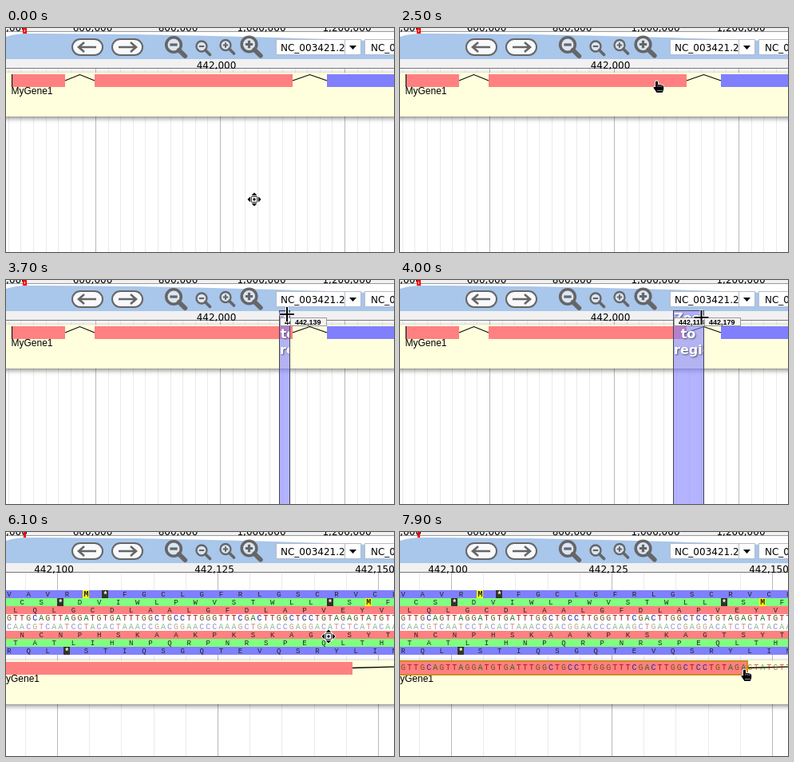
Recreate the animation shown at these times as an HTML page. Size 486 px wide and 281 px high, loop 8 s.

```html
<!DOCTYPE html>
<html lang="en">
<head>
<meta charset="utf-8">
<title>Zoom to a region</title>
<style>
  html, body { margin: 0; width: 486px; height: 281px; overflow: hidden; background: #fff; }
  svg { display: block; }
  text { font: 12px "DejaVu Sans", sans-serif; white-space: pre; }
  .gene { font-family: "Liberation Sans", Arial, sans-serif; }
  .seq { font: 10px "Liberation Mono", "Courier New", monospace; text-anchor: middle; }
  .amino { font-size: 9px; }
  .bold { font-weight: bold; }
  .flag { font: bold 9px "Liberation Sans", Arial, sans-serif; }
  .zoom { font: bold 16px "DejaVu Sans", sans-serif; fill: #fff; text-shadow: 1px 1px 2px #557; }
  .mid { text-anchor: middle; }
  .crisp { shape-rendering: crispEdges; }
  .track { filter: drop-shadow(0 2px 3px rgba(0, 0, 0, .5)); }
</style>
</head>
<body>
<svg id="stage" width="486" height="281" viewBox="0 0 486 281">
  <defs>
    <clipPath id="band"><rect id="bandClip" y="39" height="242"/></clipPath>
  </defs>
  <g id="far"></g>
  <g id="near"></g>
  <g id="head"></g>
  <g id="guides"></g>
  <g id="pointer"></g>
</svg>
<script>
const LOOP = 8000, W = 486, H = 281;
const BLUE = '#8080ff', GREEN = '#80ff80', RED = '#ff8080', CREAM = '#ffffdd', INK = '#666';
const BASE_COLORS = { A: '#1a701a', C: '#2a2aa0', G: '#785618', T: '#b01818' };
const PAIR = { A: 'T', T: 'A', C: 'G', G: 'C' };
const DNA = 'GTTGCAGTTAGGATGTGATTTGGCTGCCTTGGGTTTCGACTTGGCTCCTGTAGAGTATGTT';
const BP = 8.04, FAR_BP = 0.6243;

const $ = id => document.getElementById(id);

function add(parent, tag, attrs = {}, content) {
  const el = document.createElementNS('http://www.w3.org/2000/svg', tag);
  for (const k in attrs) el.setAttribute(k, attrs[k]);
  if (content !== undefined) el.textContent = content;
  parent.appendChild(el);
  return el;
}
const rect = (p, x, y, width, height, fill, more) =>
  add(p, 'rect', { x, y, width, height, fill, class: 'crisp', ...more });
const text = (p, x, y, str, cls = '', more) => add(p, 'text', { x, y, class: cls, ...more }, str);
const line = (p, d, stroke, width = 1, more) =>
  add(p, 'path', { d, stroke, 'stroke-width': width, fill: 'none', ...more });
const show = (el, on) => el.setAttribute('visibility', on ? 'visible' : 'hidden');

function grid(p, first, step, count, isMajor) {
  for (let i = 0; i < count; i++) {
    rect(p, Math.floor(first + i * step), 51, 1, H - 51, isMajor(i) ? '#b9b9b9' : '#ebebeb');
  }
}

const track = (p, y) => rect(p, -20, y, W + 40, 55, CREAM, { class: 'track' });

function buildFar(p) {
  grid(p, 3.2, 25 * FAR_BP, 32, i => i % 10 === 7);
  track(p, 56);
  rect(p, 7, 58, 67, 16, RED);
  rect(p, 111, 58, 248, 16, RED);
  rect(p, 402, 58, 84, 16, BLUE);
  rect(p, 7, 58, 1, 16, '#000');
  line(p, 'M74 66L92.5 58.5L111 66M359 66L380.5 58.5L402 66', '#000', 1.1);
  text(p, 6.5, 83, 'MyGene1', 'gene');
}

const baseX = i => +((i + 0.5) * BP).toFixed(2);

function bases(p, str, y, opacity) {
  for (const b in BASE_COLORS) {
    const at = [...str].flatMap((c, i) => c === b ? [i] : []);
    text(p, at.map(baseX).join(' '), y, b.repeat(at.length), 'seq', { fill: BASE_COLORS[b], opacity });
  }
}

function aminos(p, str, y, offset, fill) {
  rect(p, 0, y, W, 10.4, fill);
  [...str].forEach((c, i) => {
    const x = baseX(offset + 3 * i), stop = c === '*', start = c === 'M';
    if (stop || start) rect(p, Math.floor(x - 4), y, 8, 10, stop ? '#33332a' : '#ffff00');
    text(p, x, y + (stop ? 9 : 8), c, stop || start ? 'seq bold' : 'seq amino', { fill: stop ? '#fff' : '#222' });
  });
}

function buildNear(p) {
  grid(p, 24.3, 40.2, 12, i => i % 5 === 1);
  track(p, 161);
  aminos(p, 'VAVRM*FGCLGFRLGSCRVCL', 73, 0, BLUE);
  aminos(p, 'CS*DVIWLPWVSTWLL*SMF', 83, 2, GREEN);
  aminos(p, 'LQLGCDLAALGFDLAPVEYV', 93, 1, RED);
  rect(p, 0, 103, W, 21, '#fff');
  bases(p, DNA, 111, 1);
  bases(p, [...DNA].map(b => PAIR[b]).join(''), 121.5, 0.5);
  aminos(p, 'NCNPHSKAAKPKSKAGTSYT', 124, 2, RED);
  aminos(p, 'TATLIHNPQRPNRSPEQLTH', 134, 1, GREEN);
  aminos(p, 'RQL*STIQSGQTEVQSRYLIN', 144, 0, BLUE);
  rect(p, 0, 163, 434, 16, RED);
  line(p, 'M434 170.5L711 163', '#000', 1.4);
  text(p, -10, 188, 'MyGene1', 'gene');
  const lit = add(p, 'g');
  rect(lit, -4, 162, 439, 17, RED, { stroke: '#d18a1c', 'stroke-width': 2 });
  bases(lit, DNA.slice(0, 54), 173, 1);
  const rest = add(lit, 'g', { transform: `translate(${54 * BP} 0)` });
  bases(rest, DNA.slice(54), 173, 0.7);
  return lit;
}

function lens(p, x, y, r, reach, width, plus) {
  const k = r * 0.72, s = r * 0.5;
  add(p, 'circle', { cx: x, cy: y, r, fill: '#dbe6f5', stroke: INK, 'stroke-width': width });
  line(p, `M${x + k} ${y + k}L${x + reach} ${y + reach}`, INK, width * 1.6, { 'stroke-linecap': 'round' });
  line(p, `M${x - s} ${y}h${2 * s}` + (plus ? `M${x} ${y - s}v${2 * s}` : ''), INK, width * 0.9);
}

function pill(p, x, dir) {
  add(p, 'rect', { x: x - 19, y: 14, width: 38, height: 20, rx: 10, fill: '#f8f9fb', stroke: INK, 'stroke-width': 2 });
  line(p, `M${x - 11 * dir} 24H${x + 10 * dir}M${x + 4 * dir} 18L${x + 11 * dir} 24L${x + 4 * dir} 30`, INK, 2.6);
}

function buildHead(p) {
  rect(p, 0, 0, W, 39, '#fff');
  rect(p, 0, 0, W, 5, '#f1f1f1');
  rect(p, 0, 4, W, 1, '#999');
  add(p, 'path', { d: 'M0 11Q8 8 22 7H26C160 7 330 11 486 17V39H0Z', fill: '#a9c6eb' });
  [[2, '400,000'], [108.5, '600,000'], [215.5, '800,000'], [320, '1,000,000'], [427, '1,200,000']]
    .forEach(([x, s]) => text(p, x, 4, s, 'mid'));
  const far = add(p, 'g'), near = add(p, 'g');
  rect(far, 21, 0, 5, 7, '#f00');
  rect(far, 23, 2, 1, 3, '#fcc');
  rect(near, 22, 0, 3, 7, '#f00');
  pill(p, 102, -1);
  pill(p, 152, 1);
  lens(p, 210, 21, 9.3, 14.3, 3.6, false);
  lens(p, 245, 23, 6.5, 10.5, 2.3, false);
  lens(p, 275, 21.5, 6.5, 10.5, 2.3, true);
  lens(p, 304.5, 20.5, 9.3, 14.3, 3.6, true);
  rect(p, 338.5, 14.5, 106, 19, '#fff', { stroke: '#b5bcc7' });
  rect(p, 424, 15, 1, 19, '#b5bcc7');
  add(p, 'path', { d: 'M430 22h9l-4.5 5z' });
  rect(p, 449.5, 14.5, 60, 19, '#fff', { stroke: '#b5bcc7' });
  text(p, 344, 29, 'NC_003421.2');
  text(p, 457, 29, 'NC_003421.2');
  rect(p, 0, 39, W, 12, '#f1f1f1');
  rect(p, 0, 50, W, 1, '#777');
  text(far, 263.5, 51, '442,000', 'mid');
  [100, 125, 150].forEach((n, i) => text(near, 60 + 201 * i, 51, '442,' + n, 'mid'));
  p.append(far, near);
  return { far, near };
}

function makeFlag(p) {
  const g = add(p, 'g');
  rect(g, 1.5, 47.5, 45, 10, '#f5f5f5', { stroke: '#999' });
  const label = text(g, 7, 56, '', 'flag');
  return (on, x, str) => {
    show(g, on);
    g.setAttribute('transform', `translate(${x} 0)`);
    label.textContent = str;
  };
}

function buildGuides(p) {
  const rule = rect(p, 0, 39, 1, H - 39, '#f00');
  const band = add(p, 'g');
  const body = rect(band, 342.5, 38.5, 0, 250, 'rgba(128,128,255,.6)', { stroke: '#445' });
  const words = add(band, 'g', { 'clip-path': 'url(#band)' });
  text(words, 343, 53, 'Zoom', 'zoom');
  const to = text(words, 361, 73, 'to', 'zoom mid');
  text(words, 343, 93, 'region', 'zoom');
  return { rule, band, body, to, left: makeFlag(p), right: makeFlag(p) };
}

function buildPointers(p) {
  const edge = { stroke: '#fff', 'paint-order': 'stroke', 'stroke-width': 1.6, 'stroke-linejoin': 'round' };
  const move = add(p, 'g'), hand = add(p, 'g'), cross = add(p, 'g');
  add(move, 'path', { d: 'M0 -9L9 0L0 9L-9 0Z', fill: '#fff' });
  for (let a = 0; a < 360; a += 90) {
    add(move, 'path', { d: 'M0 -8.5L3.4 -5.2H-3.4Z', transform: `rotate(${a})`, ...edge });
  }
  add(move, 'rect', { x: -3.8, y: -3.8, width: 7.6, height: 7.6, rx: 1.5, fill: '#fff', stroke: '#000' });
  add(move, 'circle', { r: 1.7 });
  add(hand, 'path', {
    d: 'M-1.5 1.5Q0 -.7 1.5 1.5V5Q3 4.2 4 5.2Q5.5 4.6 6.3 5.8Q8.5 5.6 8.7 7.5V11L7.3 15H0L-4 9Q-4 6.8 -1.5 8.3Z',
    ...edge
  });
  line(hand, 'M1.7 5.5V8M4.1 5.7V8M6.4 6.2V8.2M.5 12.6H7.2', '#fff', 0.6);
  line(cross, 'M-9.5 0H9.5M0 -9.5V9.5', '#fff', 3.6);
  line(cross, 'M-9 0H9M0 -9V9', '#000', 2);
  return { move, hand, cross };
}

// time, pointer, x, y
const STEPS = [
  [0, 'move', 311, 215], [500, 'move', 310, 204], [600, 'move', 306, 176], [700, 'move', 300, 139],
  [800, 'move', 295, 105], [900, 'move', 291.5, 82], [1000, 'move', 290.5, 73], [1200, 'hand', 288.5, 64],
  [2500, 'hand', 321.5, 66], [2600, 'hand', 338, 58], [2700, 'cross', 347, 49], [2800, 'cross', 352, 46],
  [2900, 'cross', 354, 44], [3000, 'cross', 352, 42], [3100, 'cross', 348, 41], [3200, 'cross', 343, 40],
  [3300, 'cross', 341, 40], [3600, 'cross', 344, 41], [3700, 'cross', 352, 43], [3800, 'cross', 362, 45],
  [3900, 'cross', 372, 46], [4000, 'cross', 377.5, 47], [5400, 'cross', 378, 47],
  [5600, 'cross', 381, 47], [5700, 'cross', 385, 49], [5800, 'move', 390, 62], [5900, 'move', 395, 86],
  [6000, 'move', 400, 110], [6100, 'move', 404, 131], [6200, 'move', 406, 149], [6300, 'hand', 407, 161],
  [6400, 'hand', 407, 166], [6500, 'hand', 412, 168], [6600, 'hand', 418, 171], [6700, 'hand', 422, 172],
  [7500, 'hand', 424, 172], [7600, 'hand', 426, 172], [7700, 'hand', 428, 172], [7900, 'hand', 431.5, 172]
];
const DRAG_START = 3600, ZOOMED = 5400, LIT = 7000, ANCHOR = 342;

buildFar($('far'));
const lit = buildNear($('near'));
const head = buildHead($('head'));
const guides = buildGuides($('guides'));
const pointers = buildPointers($('pointer'));

const position = (x, zoomed) =>
  '442,' + Math.floor(zoomed ? 100 + (x - 64.3) / BP : (x - 268) / FAR_BP);

function draw(t) {
  const [, kind, x, y] = STEPS.findLast(s => s[0] <= t);
  const zoomed = t >= ZOOMED, drag = t >= DRAG_START && !zoomed, ruler = kind === 'cross';
  const edge = Math.floor(x + 3);

  for (const el of [$('far'), head.far]) show(el, !zoomed);
  for (const el of [$('near'), head.near]) show(el, zoomed);
  show(lit, t >= LIT);

  show(guides.rule, ruler && !drag);
  guides.rule.setAttribute('x', edge);
  show(guides.band, drag);
  const width = Math.max(0, edge - ANCHOR);
  guides.body.setAttribute('width', width);
  $('bandClip').setAttribute('x', ANCHOR + 1);
  $('bandClip').setAttribute('width', Math.max(0, width - 1));
  guides.to.setAttribute('x', Math.max(353, ANCHOR + width / 2));
  guides.left(drag, ANCHOR, position(ANCHOR, false));
  guides.right(ruler, edge, position(edge, zoomed));

  for (const k in pointers) show(pointers[k], k === kind);
  $('pointer').setAttribute('transform', `translate(${x} ${y})`);
}

const begin = performance.now();
function tick() {
  draw((performance.now() - begin) % LOOP);
  requestAnimationFrame(tick);
}
draw(0);
requestAnimationFrame(tick);
</script>
</body>
</html>
```
